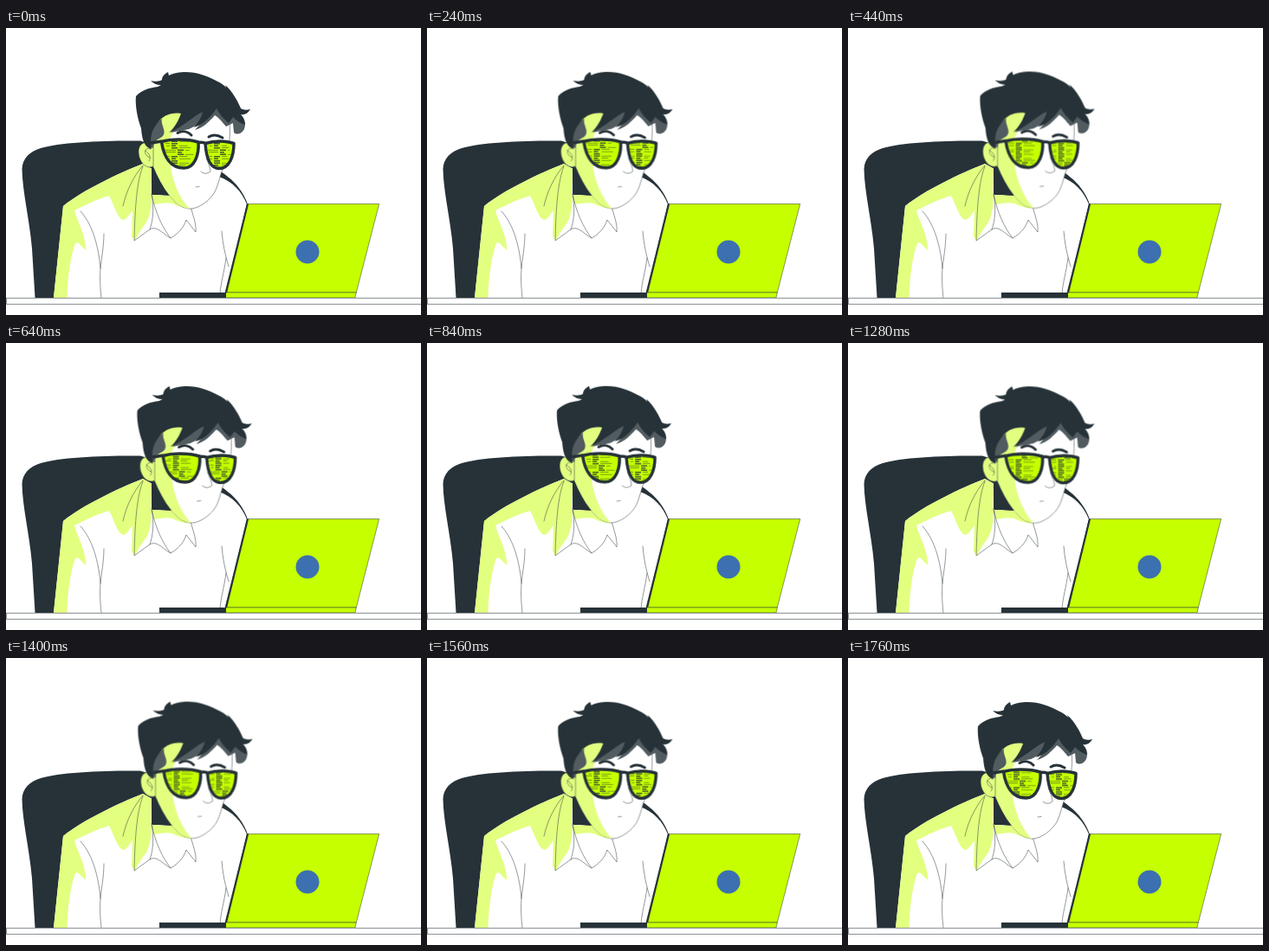
Write an HTML page that moves like this. It is 479x332 px and loops after 1.8 s.

```html
<!DOCTYPE html>
<html lang="en">
<head>
<meta charset="utf-8">
<title>Man at laptop</title>
<style>
  html, body { margin: 0; width: 100%; height: 100%; overflow: hidden; background: #fff; }
  svg { display: block; width: 479px; height: 332px; }
  .dark { fill: #263238; }
  .gray { fill: #515b60; }
  .lime { fill: #c6ff00; }
  .pale { fill: #e2ff80; }
  .white { fill: #fff; }
  .line { fill: none; stroke: #263238; stroke-width: .5; stroke-linecap: round; stroke-linejoin: round; }
  .edge { stroke: #263238; stroke-width: .5; stroke-linejoin: round; }
  .frame { fill: none; stroke: #263238; stroke-width: 3.5; stroke-linejoin: round; }
  .brow { fill: none; stroke: #263238; stroke-width: 3; stroke-linecap: round; }
  /* The head circles: two side sways for each rise and fall. */
  #sway { animation: sway 450ms cubic-bezier(.37, 0, .63, 1) infinite alternate; }
  #lift { animation: lift 900ms cubic-bezier(.37, 0, .63, 1) infinite alternate; }
  #code { animation: scroll 900ms linear infinite; }
  @keyframes sway { to { transform: translateX(2.6px); } }
  @keyframes lift { to { transform: translateY(-1.2px); } }
  @keyframes scroll { to { transform: translateY(-30px); } }
</style>
</head>
<body>
<svg viewBox="0 0 479 332">
  <defs>
    <path id="lensL" d="M179.500 131.500 C190 128 210 128 222 132 C223 146 218 162 205.500 162 C190 162 182 149 179.500 131.500Z"/>
    <path id="lensR" d="M230 133.500 C240 130 254 130 263 133.500 C263 148 258 162.500 246 162.500 C235 162.500 231 148 230 133.500Z"/>
    <clipPath id="lenses"><use href="#lensL"/><use href="#lensR"/></clipPath>
  </defs>

  <!-- chair -->
  <path class="dark" d="M33.500 312 L30 255 C27 220 19 190 18.500 163 C19 151 27 143 40 139 C62 132 116 130 155 130.500 L220 150 C247 164 270 177 279 204 L279 312Z"/>

  <!-- shirt -->
  <path class="white" d="M55 312 L66 206 C88 188 130 168 158 157 L169 163 L169 193 L232 193 L246 172 C262 178 272 189 278 204 L253 312Z"/>
  <path class="pale" d="M55 312 L66 206 C88 188 130 168 158 157 L168 163 L167 190 C169 204 166 217 162 225 C157 232 152 238 149 246 L145 241 L146 211 C142 216 139 222 135 222 C128 219 125 205 119 194 C105 198 91 205 79 211 C83 226 91 236 92.500 257 C87 254 84 246 80 249 C74 265 71 291 70.500 312Z"/>
  <path class="dark" d="M168 158 L168 192 L192 195 L188 170Z"/>
  <path class="pale" d="M167.500 193 L192 194 L214 208 C207 209 200 207 192 203 C185 201 177 203 171 204Z"/>
  <path class="line" d="M158 160 C151 178 149 205 148 246 L166 233 C174 228 182 239 190 243 C199 238 205 231 208 222 L219 236 C220 226 215 215 213 206"/>
  <path class="line" d="M168 192 C172 213 181 232 190 243 M168 192 C171 208 170 222 166 233 M158 159 C147 172 139 188 135 206"/>
  <path class="line" d="M86 212 C97 224 106 245 109 278 C108 292 109 302 110 312 M113 238 C113 253 110 267 109 278"/>
  <path class="line" d="M249 235 C250 249 253 263 257 276 M254 266 C252 282 248 294 247 307"/>

  <g id="lift"><g id="sway">
    <path class="white edge" d="M170 160 L168 112 L192 88 L248 88 L258 108 C260 128 256 148 250 163 C246 174 244 187 238 194 C231 203 219 210 211 209 C202 208 195 202 189 194 C181 184 175 172 170 160Z"/>
    <path class="pale" d="M170 160 L168 112 L180 95 L212 96 L205 110 C190 119 188 127 189 149 C190 174 200 197 212 209 C202 208 195 202 189 194 C181 184 175 172 170 160Z"/>
    <path class="pale edge" d="M170 137 C164 129 153 132 153 143 C153 155 162 164 170 160Z"/>
    <path class="line" d="M167 140 C159 137 158 147 166 150 M161 142 C166 146 168 150 165 154"/>

    <!-- hair -->
    <path class="gray" d="M165 137 C165 121 169 110 180 105 C178 112 186 119 181 125 C176 130 172 127 170 139Z"/>
    <path class="gray" d="M190 121 C202 110 219 97 238 92 L260 92 L276 111 C276 121 268 125 263 121 L262 110 L254 114 C249 108 245 103 241 101 C234 109 228 115 218 118 L225 110 L211 117Z"/>
    <path class="dark" d="M168 140 C160 138 157 130 156 116 C151 102 149 88 150 79 C156 72 166 69 175 68 L179 66 C174 66 170 64 167 61 C172 62 177 62 180 60 C180 56 183 53 187 51 L188 55 C197 50 215 50 226 54 C238 58 250 64 254 69 L253 66 C262 74 267 84 271 93 C274 95 278 95 282 94 C279 99 275 101 271 100 C275 104 276 108 276 112 C270 110 265 106 262 103 L257 110 C251 105 246 99 243 93 C236 103 229 111 217 115 C222 109 226 103 227 97 C214 103 204 115 188 121 C195 115 199 107 202 99 C192 97 180 101 174 111 C168 119 166 126 168 140Z"/>

    <!-- face -->
    <path class="brow" d="M198 121.500 C204 118 210 120 214 124 M234 126 C239 123 245 124 250 127"/>
    <path class="line" d="M231 150 C233 156 236 161 236 166 C232 169 228 169 225 166 M219 184 L223 183.500"/>

    <!-- glasses -->
    <use href="#lensL" class="lime"/>
    <use href="#lensR" class="lime"/>
    <g clip-path="url(#lenses)"><g id="code" class="dark" opacity=".8"></g></g>
    <use href="#lensL" class="frame"/>
    <use href="#lensR" class="frame"/>
    <path class="frame" d="M167 133 L180 131 M221 133 C224 132 228 132 231 134"/>
  </g></g>

  <!-- laptop -->
  <path class="lime edge" d="M279 203.500 H430.700 L404.300 306 H253Z"/>
  <path class="lime edge" d="M253 306 H404.300 L403 312 H253Z"/>
  <path d="M279 203.500 L254 306" fill="none" stroke="#263238" stroke-width="2.200"/>
  <path class="dark" d="M177 306 H254 V312 H177Z"/>
  <circle cx="348" cy="259" r="13.500" fill="#3c70b0"/>

  <!-- desk -->
  <rect class="white" x=".5" y="312.500" width="480" height="7" stroke="#8b9296"/>
</svg>
<script>
  const code = document.getElementById('code');
  const pitch = 2.5, rows = 12;

  function bar(x, y, w, h) {
    const r = document.createElementNS('http://www.w3.org/2000/svg', 'rect');
    Object.entries({ x, y, width: w, height: h }).forEach(([k, v]) => r.setAttribute(k, v));
    code.append(r);
  }

  // Each lens shows the same listing: a stepped column of blocks between thin lines.
  // It is repeated below itself so the scroll has no seam.
  for (let i = 0; i < rows * 2 + 2; i++) {
    const n = i % rows, y = 128 + i * pitch;
    const step = n > 4 && n < 8 ? 7 : 0;
    for (const [left, block, end] of [[182, 191, 219], [232, 240, 261]]) {
      const x = block + step;
      bar(x, y, n % 3 ? 7 : 5, 1.5);
      if (n % 3 !== 1) bar(left + n % 4, y + .4, x - left - 2 - n % 4, .6);
      if (n % 4 !== 2) bar(x + 9, y + .4, (end - x - 9) * (.4 + n * 7 % 5 / 10), .6);
    }
  }
</script>
</body>
</html>
```
